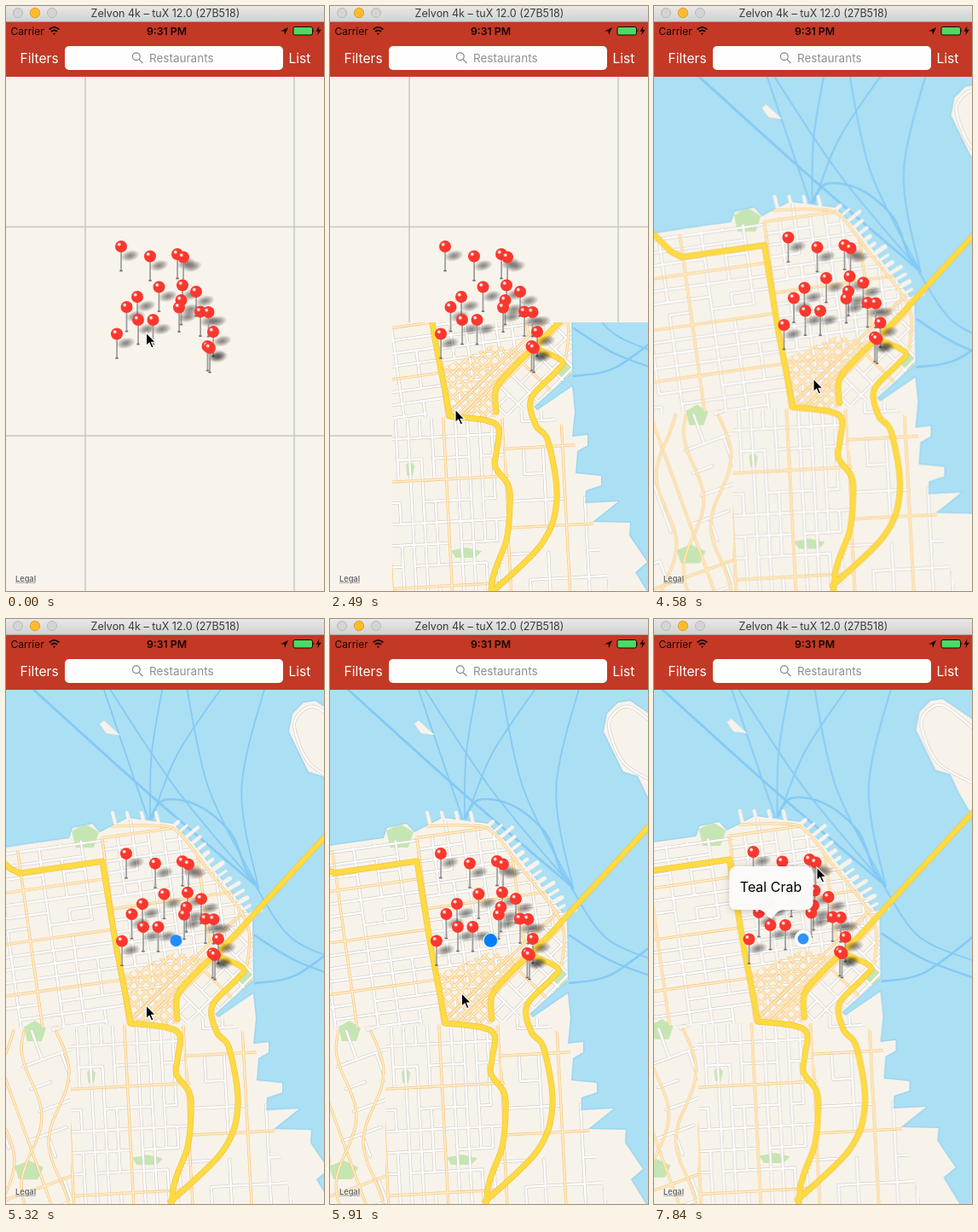
An HTML page with a canvas for the animation above (7990 ms loop, 373 px wide and 686 px high).

```html
<!DOCTYPE html>
<html lang="en">
<head>
<meta charset="utf-8">
<title>Restaurant map</title>
<style>
html, body { margin: 0; width: 373px; height: 686px; overflow: hidden; background: #f8f3eb; }
canvas, svg { position: absolute; left: 0; top: 0; width: 373px; height: 686px; display: block; }
text { font-family: Inter, Roboto, "Open Sans", sans-serif; }
</style>
</head>
<body>
<canvas id="map"></canvas>
<svg viewBox="0 0 373 686">
  <defs>
    <radialGradient id="shade">
      <stop offset="0" stop-opacity=".46"/>
      <stop offset=".45" stop-opacity=".3"/>
      <stop offset="1" stop-opacity="0"/>
    </radialGradient>
    <radialGradient id="shine">
      <stop offset=".3" stop-color="#fff"/>
      <stop offset="1" stop-color="#fff" stop-opacity="0"/>
    </radialGradient>
    <linearGradient id="chrome" x2="0" y2="1">
      <stop offset="0" stop-color="#e9e8e9"/>
      <stop offset="1" stop-color="#d2d1d2"/>
    </linearGradient>
    <filter id="soft" x="-30%" y="-40%" width="160%" height="180%">
      <feDropShadow dx="0" dy="1" stdDeviation="4" flood-opacity=".22"/>
    </filter>
    <g id="pin">
      <ellipse cx="10.500" cy="11" rx="11.500" ry="6.500" transform="rotate(-14 10 11)" fill="url(#shade)"/>
      <ellipse cy="28.500" rx="2" ry="1" fill="#555" opacity=".8"/>
      <path d="M0 5V28" stroke="#8b8b8b" stroke-width="1.6"/>
      <path d="M-.4 6V27" stroke="#c4c4c4" stroke-width=".5"/>
      <circle r="7" fill="#fb382e"/>
      <circle cx="-2.300" cy="-2.400" r="2.600" fill="url(#shine)"/>
    </g>
  </defs>

  <g id="world">
    <circle id="halo" cx="193.500" cy="384" fill="#3c84cc"/>
    <g id="pins"></g>
    <g id="me" transform="translate(193.5 384)">
      <circle id="glow" fill="url(#shade)" opacity=".5"/>
      <circle id="ring" fill="#fff"/>
      <circle id="dot"/>
    </g>
    <g id="callout" filter="url(#soft)">
      <path d="M-40.500-62H41.500a8 8 0 0 1 8 8V-19a8 8 0 0 1-8 8H13Q8-10 3-3Q0 1-3-3Q-8-10-13-11H-40.500a8 8 0 0 1-8-8V-54a8 8 0 0 1 8-8Z" fill="#fcfbfa" fill-opacity=".98"/>
      <text y="-32" font-size="16" text-anchor="middle">Teal Crab</text>
    </g>
  </g>
  <text x="11" y="674.500" font-size="9.2" font-weight="600" fill="#686868" stroke="#fff" stroke-opacity=".6" stroke-width="1.5" paint-order="stroke" text-decoration="underline">Legal</text>

  <rect width="373" height="83" fill="#c33925"/>
  <rect width="373" height="18.500" fill="url(#chrome)"/>
  <path d="M0 18.500H373" stroke="#a9a3a2" stroke-width=".7"/>
  <g fill="#d5d4d5" stroke="#b9b8b9">
    <circle cx="14" cy="8" r="5.500"/>
    <circle cx="34" cy="8" r="5.700" fill="#fdbb2e" stroke="#dfa023"/>
    <circle cx="54" cy="8" r="5.500"/>
  </g>
  <text x="187" y="13" font-size="12.5" fill="#3b3b3b" text-anchor="middle">Zelvon 4k – tuX 12.0 (27B518)</text>
  <g fill="#160504">
    <text x="5.500" y="33.500" font-size="12">Carrier</text>
    <text x="188.500" y="33.500" font-size="12.3" font-weight="600" text-anchor="middle">9:31 PM</text>
    <path d="M322 29.500L331 25L327 34L326.500 29.500Z"/>
    <path d="M367.500 23.500L363.500 29.800H366.300L365 34.500L369.800 27.800H366.800Z"/>
    <path d="M360.500 27.200q1.700 1.800 0 3.800Z"/>
  </g>
  <g fill="none" stroke="#160504" stroke-width="1.8">
    <path d="M50.700 27.500Q56.500 22.300 62.300 27.500M53 30Q56.500 27 60 30"/>
    <path d="M55.200 32.300L56.500 33.600L57.800 32.300Q56.500 31.200 55.200 32.300Z" fill="#160504" stroke-width=".5"/>
  </g>
  <rect x="337" y="24.500" width="22.500" height="9.500" rx="2" fill="#4cd964" stroke="#160504"/>
  <rect x="69" y="47" width="256" height="28" rx="5" fill="#fefefe"/>
  <g fill="none" stroke="#85858a" stroke-width="1.2">
    <circle cx="152.800" cy="59.300" r="4.400"/>
    <path d="M156 62.600L160.500 67"/>
  </g>
  <text x="168" y="66" font-size="13.5" fill="#8e8e93">Restaurants</text>
  <text x="16.500" y="67" font-size="15.6" fill="#fff">Filters</text>
  <text x="331.500" y="67" font-size="15.6" fill="#fff">List</text>
  <path id="cursor" d="M0 0V15.500L3.600 12.200L6.200 18L8.700 17L6.200 11.300H11Z" fill="#000" stroke="#fff" stroke-width="1.1"/>
</svg>

<script>
const W = 373, H = 686, LOOP = 7990;
const $ = id => document.getElementById(id);
const dpr = window.devicePixelRatio || 1;
const clamp = v => Math.min(1, Math.max(0, v));

/* ---------- map ---------- */
const LEFT = -60, TOP = 50, MAP_W = 500, MAP_H = 690;
const LAND_COLOR = '#f8f3ea';
const sheet = document.createElement('canvas');
sheet.width = MAP_W * dpr;
sheet.height = MAP_H * dpr;
const g = sheet.getContext('2d');
g.scale(dpr, dpr);
g.translate(-LEFT, -TOP);
g.lineJoin = g.lineCap = 'round';

let seed = 11;
const rnd = () => (seed = (seed * 16807) % 2147483647) / 2147483647;

function line(p, closed) {
  const path = new Path2D();
  for (let i = 0; i < p.length; i += 2) path.lineTo(p[i], p[i + 1]);
  if (closed) path.closePath();
  return path;
}
// Smooth line through all points
function curve(p) {
  const path = new Path2D(), n = p.length / 2;
  const at = (i, k) => p[2 * Math.min(n - 1, Math.max(0, i)) + k];
  const knob = (i, d, k) => at(i, k) + d * (at(i + 1, k) - at(i - 1, k)) / 6;
  path.moveTo(p[0], p[1]);
  for (let i = 0; i < n - 1; i++)
    path.bezierCurveTo(knob(i, 1, 0), knob(i, 1, 1), knob(i + 1, -1, 0), knob(i + 1, -1, 1),
      at(i + 1, 0), at(i + 1, 1));
  return path;
}
function fill(path, color) { g.fillStyle = color; g.fill(path); }
function stroke(path, color, width) {
  g.strokeStyle = color;
  g.lineWidth = width;
  g.stroke(path);
}
const LOCAL = ['#d3cfc7', 3.8, '#fff', 2.4];
const TAN = ['#f8c980', 3.2, '#fff0cf', 1.6];
const HIGHWAY = ['#efc344', 7, '#ffdb42', 5.6];
function roads(paths, [edge, wide, core, thin]) {
  paths.forEach(p => stroke(p, edge, wide));
  paths.forEach(p => stroke(p, core, thin));
}
function shore(path) {
  stroke(path, '#9dd6ef', 3);
  fill(path, LAND_COLOR);
}

// Turned grid of local streets with gaps; every n-th line is a tan main road
function district(area, deg, du, dv, gap, every) {
  const local = new Path2D(), main = new Path2D(), R = 32;
  g.save();
  g.clip(line(area, true));
  g.translate(130, 430);
  g.rotate(deg * Math.PI / 180);
  const put = (path, x, y, w, h) => { path.moveTo(x, y); path.lineTo(x + w, y + h); };
  for (let i = -R; i < R; i++)
    for (let j = -R; j < R; j++) {
      const x = i * du, y = j * dv;
      if (j % every === 0) put(main, x, y, du, 0);
      else if (rnd() > gap) put(local, x, y, du, 0);
      if (i % every === 0) put(main, x, y, 0, dv);
      else if (rnd() > gap) put(local, x, y, 0, dv);
    }
  roads([local], LOCAL);
  roads([main], TAN);
  g.restore();
}

function ferries() {
  const draw = (p, w = 1.7) => stroke(curve(p), '#83c9f4', w);
  for (let i = 0; i < 3; i++) {
    const x = 104 + 76 * i;
    draw([x, 75, 158 + (x - 163) * .4, 165, 163, 248]);
  }
  for (let i = 0; i < 4; i++) {
    const x = 10 + 97 * i;
    draw([x, 75, 150 + .4 * x, 205, 290, 322], i ? 1.7 : 2.6);
  }
  draw([163, 240, 180, 219, 220, 226, 258, 258, 275, 300, 290, 322], 2.4);
  draw([288, 322, 330, 382, 400, 412]);
  for (const s of [-1, 1]) draw([286, 406 + 28 * s, 335, 416 + 8 * s, 400, 404 - 28 * s], 2.4);
}

function piers() {
  for (let i = 0; i < 15; i++) {
    const k = i / 14, x = 188 + 90 * k, y = 252 + 102 * k, l = 10 + 14 * rnd();
    stroke(line([x - 4, y + 3, x + l * .82, y - l * (.75 - .4 * k)]), LAND_COLOR, 3 + 3 * rnd());
  }
  for (let x = 123; x < 180; x += 17) stroke(line([x, 250, x - 4, 234]), LAND_COLOR, 4);
}

function drawMap() {
  const land = line([
    -70, 285, 18, 271, 68, 264, 72, 252, 95, 247, 104, 257, 137, 240, 190, 247, 215, 272, 283, 358,
    284, 430, 239, 470, 243, 474, 284, 446, 287, 475, 284, 505, 302, 503, 302, 515, 290, 522,
    288, 548, 318, 551, 318, 562, 300, 568, 299, 583, 338, 581, 308, 605, 352, 606, 351, 621,
    372, 652, 358, 664, 380, 700, 380, 760, -70, 760], true);
  g.fillStyle = '#abdff4';
  g.fillRect(LEFT, TOP, MAP_W, MAP_H);
  ferries();
  shore(land);
  piers();

  g.save();
  g.clip(land);
  // Parks: centre and radii
  for (const [x, y, rx, ry] of [[87, 261, 16, 14], [28, 490, 13, 12], [94, 542, 5, 9],
    [160, 641, 18, 6], [21, 653, 17, 11], [275, 428, 9, 13]])
    fill(line([x - rx, y - ry * .4, x, y - ry, x + rx, y - ry * .3, x + rx * .6, y + ry, x - rx * .7, y + ry], true), '#c5e6b3');

  district([-70, 290, 112, 262, 113, 340, 139, 482, -70, 490], -8, 25, 15, .15, 4);
  district([106, 262, 137, 242, 190, 249, 280, 352, 262, 372, 139, 478, 112, 330], -8, 18, 14, .08, 6);
  district([139, 478, 268, 357, 284, 372, 284, 430, 235, 470, 200, 482, 147, 484], -45, 19, 15, .1, 4);
  district([130, 425, 190, 398, 230, 403, 196, 440, 194, 482, 147, 482], -45, 10, 10, .1, 1);
  district([70, 486, 147, 482, 198, 488, 212, 560, 205, 640, 190, 750, 70, 750], -3, 14, 25, .12, 5);
  district([-70, 495, 70, 486, 70, 750, -70, 750], -20, 24, 28, .55, 7);
  district([198, 485, 240, 468, 284, 500, 300, 570, 345, 750, 190, 750, 212, 560], -3, 23, 31, .25, 3);

  // Winding hill roads, the shore road and the diagonal main street
  const hills = [0, 1, 2, 3].map(i => {
    const p = [];
    for (let y = 490; y < 760; y += 22) p.push(-40 + 32 * i + 12 * Math.sin(y / 26 + 2 * i), y);
    return curve(p);
  });
  roads([...hills,
    curve([118, 250, 165, 249, 195, 256, 230, 300, 276, 362, 277, 412]),
    line([139, 478, 272, 350]), line([152, 484, 240, 398])], TAN);
  g.restore();

  const isle = line([326, 139, 330, 118, 343, 105, 357, 103, 391, 126, 445, 170, 445, 240,
    391, 238, 378, 216, 366, 191, 349, 186], true);
  shore(isle);
  g.save();
  g.clip(isle);
  roads([curve([400, 205, 352, 178, 333, 138, 337, 119, 357, 110, 388, 133, 420, 160])], LOCAL);
  g.restore();
  fill(line([104, 130, 109, 126, 121, 137, 128, 143, 112, 141], true), LAND_COLOR);

  roads([
    line([-70, 276, -24, 277, -2, 299, 10, 305, 107, 291, 123, 390, 140, 478]),
    curve([140, 481, 183, 486, 198, 496, 195, 524, 194, 541, 209, 562, 211, 586, 207, 626, 190, 676, 187, 750]),
    curve([420, 206, 337, 296, 284, 354, 260, 380, 213, 426, 195, 449, 195, 476]),
    curve([240, 401, 272, 416, 264, 430, 236, 460, 241, 491, 256, 511, 266, 578, 248, 631, 187, 690])
  ], HIGHWAY);
}
drawMap();

const canvas = $('map');
canvas.width = W * dpr;
canvas.height = H * dpr;
const ctx = canvas.getContext('2d');

// Map tiles meet at this corner and load one after another
const SEAM_X = 73, SEAM_Y = 371, READY = [1600, 2930, 3390, 4140];
function paint(t, ox, oy) {
  ctx.setTransform(dpr, 0, 0, dpr, 0, 0);
  ctx.fillStyle = '#f8f3eb';
  ctx.fillRect(0, 0, W, H);
  ctx.fillStyle = '#c6c5c3';
  for (const x of [93, 338]) ctx.fillRect(x - .7, 83, 1.4, H);
  for (const y of [259, 504]) ctx.fillRect(0, y - .7, W, 1.4);
  READY.forEach((ready, i) => {
    if (t < ready) return;
    const x = i < 2 ? SEAM_X : LEFT, w = i < 2 ? LEFT + MAP_W - SEAM_X : SEAM_X - LEFT;
    const y = i % 2 ? TOP : SEAM_Y, h = i % 2 ? SEAM_Y - TOP : TOP + MAP_H - SEAM_Y;
    ctx.drawImage(sheet, (x - LEFT) * dpr, (y - TOP) * dpr, w * dpr, h * dpr, x + ox, y + oy, w, h);
  });
}

/* ---------- pins ---------- */
const PINS = [
  [135, 282], [201, 291], [169, 293.5], [208, 294.5], [207, 327.5], [179.5, 329.5], [223, 335],
  [154, 341], [205.5, 345], [141.5, 353], [203, 353.5], [228, 358.5], [237.5, 359], [155, 368],
  [172.5, 368], [243, 382], [130, 384.5], [236.5, 399], [239, 401]
];
$('pins').innerHTML = PINS.map(([x, y]) => `<use href="#pin" x="${x}" y="${y}"/>`).join('');

/* ---------- motion ---------- */
// The picture advances in bursts: start time and number of steps
const STEP = 146;
const BURSTS = [[150, 8], [1310, 6], [2340, 7], [3390, 2], [4140, 8], [5320, 8], [6500, 8], [7690, 2]];
function snap(t) {
  const burst = BURSTS.filter(([start]) => start <= t).pop();
  if (!burst) return 0;
  const [start, n] = burst;
  return start + STEP * Math.min(n - 1, Math.floor((t - start) / STEP));
}
// Eased travel between [time, ...values] keys
function tween(keys, t) {
  let i = 0;
  while (i < keys.length - 2 && t > keys[i + 1][0]) i++;
  const [a, b] = [keys[i], keys[i + 1]];
  const u = clamp((t - a[0]) / (b[0] - a[0])), k = u * u * (3 - 2 * u);
  return a.slice(1).map((v, j) => v + (b[j + 1] - v) * k);
}
const CURSOR = [
  [0, 164.5, 383], [1160, 215, 444], [2486, 147, 473], [3536, 153, 462], [4000, 153, 462],
  [4578, 187, 437], [5612, 159, 457], [6646, 135.5, 363], [6900, 135.5, 363], [7836, 191, 291]
];
const PAN = [[4000, 0, 0], [4578, 22.5, -10.5], [5612, 2, -6], [6350, -18.5, -9]];
const DOT_AT = 5320, PULSE_AT = 6180, TAP_AT = 6920;

const set = (id, attrs) => {
  for (const k in attrs) $(id).setAttribute(k, attrs[k]);
};
const move = (id, x, y, s = 1) => set(id, { transform: `translate(${x} ${y}) scale(${s})` });
const show = (id, on) => set(id, { visibility: on ? 'visible' : 'hidden' });

function render(t) {
  const [ox, oy] = tween(PAN, t);
  paint(t, ox, oy);
  move('world', ox, oy);
  move('cursor', ...tween(CURSOR, t));

  const p = Math.max(0, t - TAP_AT) / 100;
  show('callout', p > 0);
  move('callout', 155.5, 361, 1 - Math.exp(-p) * Math.cos(1.8 * p));

  show('me', t >= DOT_AT);
  const beat = (1 + Math.cos((t - 6300) / 3000 * 2 * Math.PI)) / 2;
  const grow = clamp(.6 + (t - DOT_AT) / 2400);
  set('ring', { r: 10.3 * grow });
  set('glow', { r: 13 * grow });
  set('dot', { r: 6.5 + 1.6 * beat, fill: `rgb(${46 - 46 * beat} ${146 - 24 * beat} 255)` });
  const u = clamp((t - PULSE_AT) / 1560);
  set('halo', { r: 59 * (1 - Math.pow(1 - u, 3)), opacity: .34 * (1 - u) });
}

const t0 = performance.now();
let shown = -1;
function tick() {
  const t = snap((performance.now() - t0) % LOOP);
  if (t !== shown) render(shown = t);
  requestAnimationFrame(tick);
}
tick();
</script>
</body>
</html>
```
